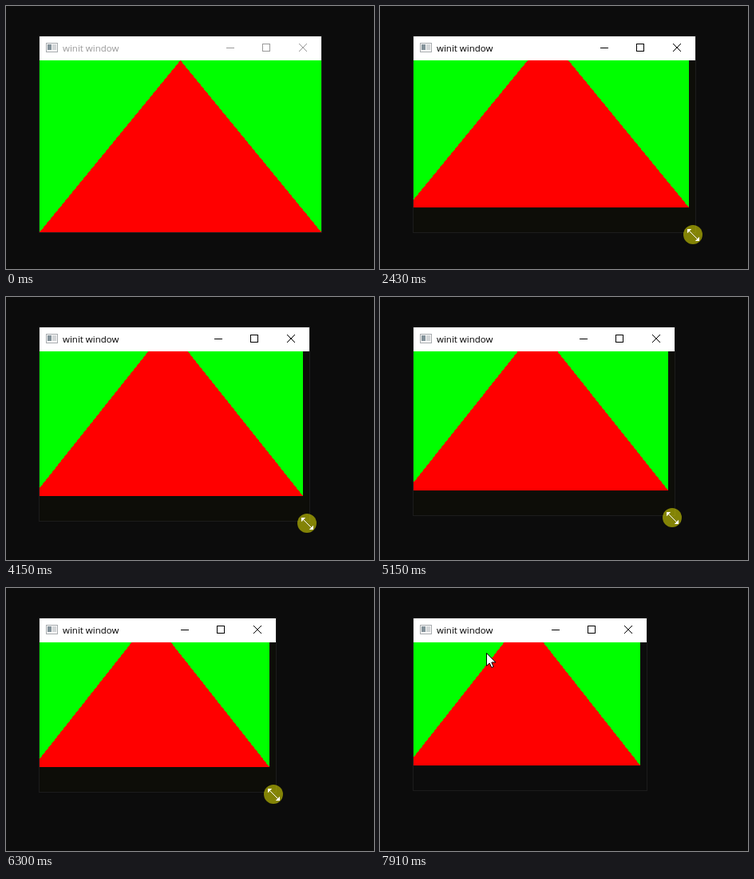
An HTML page with a canvas that plays this animation: 461x329 px, repeating every 7.99 s.

```html
<!DOCTYPE html>
<html>
<head>
<meta charset="utf-8">
<title>Resizing a window</title>
<style>
html, body { margin: 0; width: 100%; height: 100%; overflow: hidden; background: #0c0c0c; }
canvas { display: block; }
</style>
</head>
<body>
<canvas id="stage" width="461" height="329"></canvas>
<script>
const g = document.getElementById('stage').getContext('2d');
const LOOP = 7990, STEP = 76, LEFT = 42, TOP = 38, CLIENT = 68;
const ENTER = 420, HOVER = 810, PRESS = 1420, DRAG = 2430;
const SETTLE = 6530, RELEASE = 6840, LEAVE = 7300;

// Key points: time, x, y
const enter = [[ENTER, 382, 306], [HOVER, 392, 286]];
const drag = [[2350, 395, 283], [3130, 392, 282], [4150, 380, 280], [4450, 376, 277],
  [5000, 376, 277], [5460, 355, 266], [5840, 350, 262], [6450, 334, 253]];
const leave = [[LEAVE, 331, 264], [7760, 130, 100], [7830, 123, 88], [7900, 133, 81]];

function along(keys, t) {
  const i = keys.findIndex(key => key[0] > t);
  if (i < 0) return keys[keys.length - 1].slice(1);
  if (i === 0) return keys[0].slice(1);
  const [t0, x0, y0] = keys[i - 1], [t1, x1, y1] = keys[i];
  const k = (t - t0) / (t1 - t0);
  return [Math.round(x0 + (x1 - x0) * k), Math.round(y0 + (y1 - y0) * k)];
}

const stepped = (t, from) => from + Math.floor((t - from) / STEP) * STEP;

function rect(color, x, y, w, h) {
  g.fillStyle = color;
  g.fillRect(x, y, w, h);
}

function path(points, close) {
  g.beginPath();
  points.forEach(([x, y]) => g.lineTo(x, y));
  if (close) g.closePath();
}

function line(color, x1, y1, x2, y2) {
  g.strokeStyle = color;
  path([[x1, y1], [x2, y2]]);
  g.stroke();
}

function titleBar(right, color) {
  rect('#fff', LEFT, TOP, right - LEFT, CLIENT - TOP);

  rect('#a9adb0', 50, 46, 15, 12);
  rect('#f6f6f6', 51, 47, 13, 10);
  rect('#84929a', 52, 48, 5, 7);
  rect('#d3d6d8', 58, 48, 5, 7);

  g.fillStyle = color;
  g.font = '11.5px "Open Sans", "Noto Sans", sans-serif';
  g.fillText('winit window', 71, 57);

  line(color, right - 119, 52.5, right - 109, 52.5);
  g.strokeRect(right - 73.5, 47.5, 9, 9);
  line(color, right - 28, 47, right - 18, 57);
  line(color, right - 18, 47, right - 28, 57);
}

// The triangle is filled row by row to keep its edges hard
function triangle(w, h) {
  for (let y = 0; y < h; y++) {
    const half = (y + 0.5) / h * w / 2;
    const from = Math.round(w / 2 - half), to = Math.round(w / 2 + half);
    rect('#f00', from, y, to - from, 1);
  }
}

function client(right, bottom, t) {
  const moved = t >= DRAG;
  const w = right - LEFT, h = bottom - CLIENT;
  rect(moved && t < SETTLE ? '#0d0d08' : '#0c0c0c', LEFT, CLIENT, w, h);
  g.save();
  g.beginPath();
  g.rect(LEFT, CLIENT, w, h);
  g.clip();
  g.translate(LEFT - (moved ? 8 : 0), CLIENT - (moved ? 31 : 0));
  rect('#0f0', 0, 0, w, h);
  triangle(w, h);
  g.restore();
}

function arrow(x, y) {
  g.save();
  g.translate(x + 0.5, y + 0.5);
  path([[0, 0], [0, 16], [3.7, 12.5], [6.3, 18], [8.7, 17], [6.3, 11.5], [11.3, 11.5]], true);
  g.fillStyle = '#fff';
  g.fill();
  g.strokeStyle = '#000';
  g.stroke();
  g.restore();
}

function resizer(x, y) {
  g.save();
  g.translate(x + 0.5, y + 0.5);
  line('#fff', -6, -6, 6, 6);
  g.fillStyle = '#fff';
  for (const end of [-7.5, 7.5]) {
    path([[end, end], [end * 0.3, end], [end, end * 0.3]], true);
    g.fill();
  }
  g.restore();
}

function pointer(t, right, bottom) {
  if (t < ENTER) return;
  if (t >= LEAVE) {
    arrow(...along(leave, stepped(t, LEAVE)));
    return;
  }
  const [x, y] = t < HOVER ? along(enter, stepped(t, ENTER)) : [right - 3, bottom + 3];
  if (t >= PRESS && t < RELEASE) {
    g.beginPath();
    g.arc(x, y, 12, 0, 2 * Math.PI);
    g.fillStyle = 'rgba(255, 255, 0, 0.49)';
    g.fill();
  }
  if (y > 291) arrow(x, y);
  else resizer(x, y);
}

function draw(t) {
  const [right, bottom] = along(drag, t);
  rect('#0c0c0c', 0, 0, 461, 329);
  g.lineWidth = 1;
  g.strokeStyle = '#1c1c1c';
  g.strokeRect(LEFT - 0.5, TOP - 0.5, right - LEFT + 1, bottom - TOP + 1);
  client(right, bottom, t);
  titleBar(right, t < PRESS ? '#999' : '#000');
  pointer(t, right, bottom);
}

function tick() {
  draw(performance.now() % LOOP);
  requestAnimationFrame(tick);
}
tick();
</script>
</body>
</html>
```
